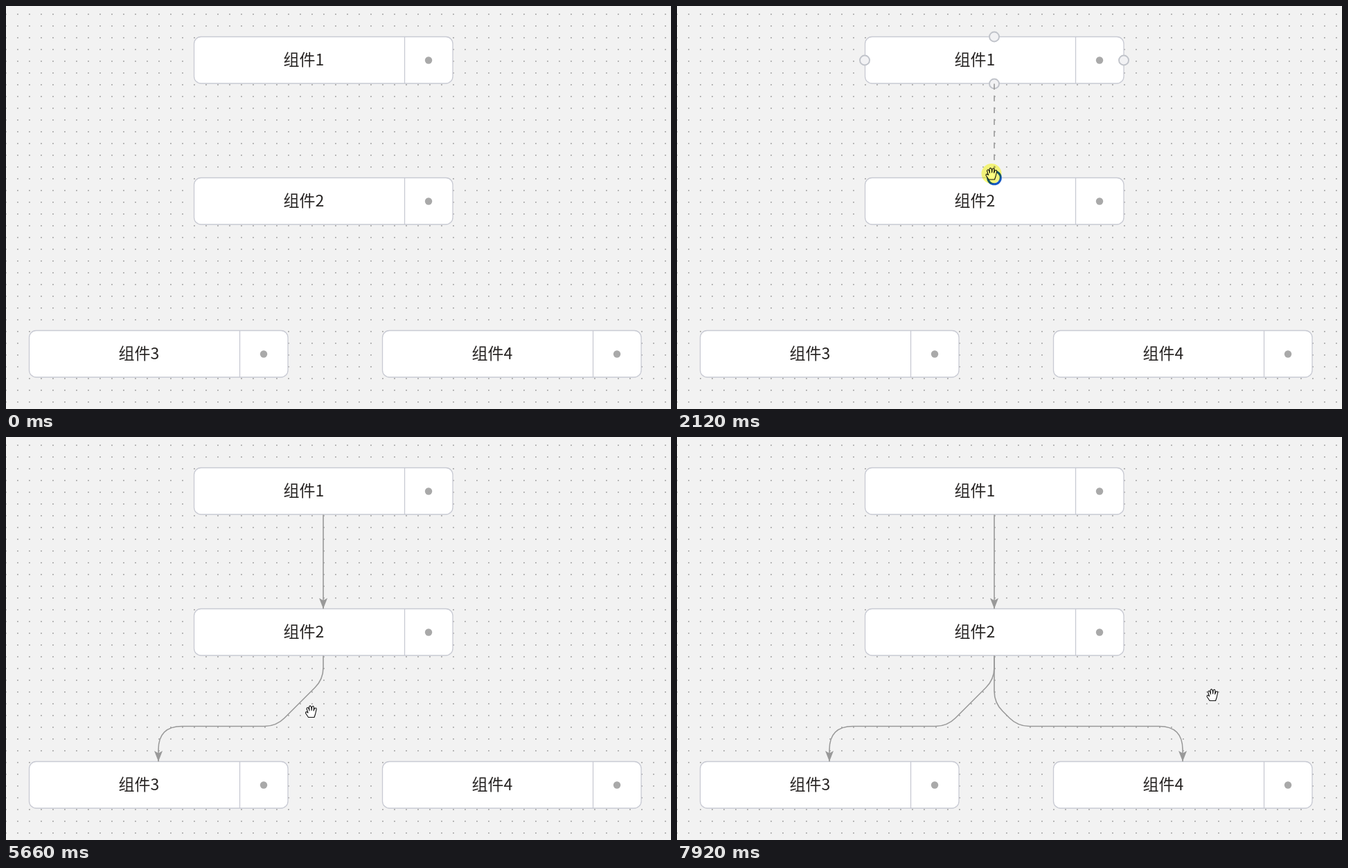
An HTML page with a canvas that plays this animation: 960x583 px, repeating every 8000 ms.

```html
<!DOCTYPE html>
<html lang="zh">
<head>
<meta charset="utf-8">
<style>
  html, body { margin: 0; width: 100%; height: 100%; overflow: hidden; background: #f2f2f2; }
  canvas { display: block; }
</style>
</head>
<body>
<canvas id="stage" width="960" height="583"></canvas>
<script>
const ctx = document.getElementById('stage').getContext('2d');
const LOOP = 8000, ENTER = 70, GRID = 17, W = 22 * GRID, H = 4 * GRID;
const LINE = '#999';

// Nodes sit on the grid; columns and rows are counted in grid steps
const nodes = [[14, 2], [14, 14], [0, 27], [30, 27]].map(([col, row], i) => ({
  x: 33 + col * GRID, y: 10.5 + row * GRID, label: '组件' + (i + 1)
}));
const [first, second, left, right] = nodes;

const point = (x, y) => ({ x, y });
const shift = (p, dx, dy) => point(p.x + dx, p.y + dy);
const near = (a, b, r) => Math.hypot(a.x - b.x, a.y - b.y) < r;
const topPort = n => point(n.x + W / 2, n.y);
const bottomPort = n => point(n.x + W / 2, n.y + H);
const portsOf = n => [topPort(n), bottomPort(n),
  point(n.x, n.y + H / 2), point(n.x + W, n.y + H / 2)];
const inside = (p, n, m) =>
  p.x > n.x - m && p.x < n.x + W + m && p.y > n.y - m && p.y < n.y + H + m;

const drags = [
  { start: 1570, end: 2200, from: first, to: second },
  { start: 3690, end: 4840, from: second, to: left },
  { start: 6280, end: 7310, from: second, to: right }
];

// The pointer rests between moves; swing bows a move sideways
const entry = shift(topPort(right), -90, 36);
const grip = shift(bottomPort(second), 2.5, -1.5);
const moves = [
  { start: ENTER, end: 400, to: shift(topPort(first), -5, 39) },
  { start: 600, end: 800, to: shift(topPort(first), -12, 28) },
  { start: 950, end: 1430, to: bottomPort(first), swing: 80 },
  { start: 1570, end: 2060, to: shift(topPort(second), -4, -6) },
  { start: 2200, end: 2330, to: shift(grip, -20, -6) },
  { start: 2660, end: 3420, to: grip },
  { start: 4160, end: 4640, to: shift(topPort(left), 14, 30) },
  { start: 4820, end: 4840, to: shift(topPort(left), 33, 20) },
  { start: 4840, end: 5460, to: shift(grip, -20, 82) },
  { start: 5660, end: 5800, to: grip },
  { start: 6280, end: 6420, to: shift(grip, 15, 2) },
  { start: 6420, end: 7060, to: shift(topPort(right), 19, -9) },
  { start: 7310, end: 7440, to: point(797, 410) },
  { start: 7440, end: 7920, to: point(773, 373) }
];

function pointerAt(t) {
  let p = entry;
  for (const { start, end, to, swing = 0 } of moves) {
    if (t < start) break;
    const k = Math.min(1, (t - start) / (end - start));
    const e = k * k * (3 - 2 * k);
    p = shift(p, (to.x - p.x) * e + swing * Math.sin(Math.PI * e), (to.y - p.y) * e);
  }
  return p;
}

function disc(p, r, fill, stroke, width) {
  ctx.beginPath();
  ctx.arc(p.x, p.y, r, 0, 2 * Math.PI);
  ctx.fillStyle = fill;
  ctx.fill();
  if (!stroke) return;
  ctx.strokeStyle = stroke;
  ctx.lineWidth = width;
  ctx.stroke();
}

function drawGrid() {
  ctx.fillStyle = '#f2f2f2';
  ctx.fillRect(0, 0, 960, 583);
  ctx.fillStyle = '#aaa';
  for (let x = -1; x < 960; x += GRID)
    for (let y = 11; y < 583; y += GRID) ctx.fillRect(x, y, 1.8, 1.8);
}

function drawNode({ x, y, label }) {
  ctx.beginPath();
  ctx.roundRect(x + .5, y, W - .5, H - .5, 10);
  ctx.fillStyle = '#fff';
  ctx.fill();
  ctx.moveTo(x + 304.5, y);
  ctx.lineTo(x + 304.5, y + H - .5);
  ctx.strokeStyle = '#c8cad3';
  ctx.lineWidth = 1.3;
  ctx.stroke();
  disc(point(x + 339, y + H / 2), 5.2, '#a9a9a9');
  ctx.fillStyle = '#262322';
  ctx.font = '23px "Noto Sans CJK SC", "Noto Sans CJK", sans-serif';
  ctx.textAlign = 'center';
  ctx.fillText(label, x + 159, y + 41.5);
}

// Octilinear path: down, diagonal, across, a one-step diagonal, down
function route(a, b) {
  const dx = b.x - a.x, side = Math.sign(dx), h = b.y - 3 * GRID;
  if (Math.abs(dx) < 2 * GRID || h < a.y + H) return [a, b];
  const d = Math.min(Math.abs(dx) - GRID, dx < 0 ? 4 * GRID : 2 * GRID);
  return [a, point(a.x, h - d), point(a.x + side * d, h),
    point(b.x - side * GRID, h), point(b.x, h + GRID), b];
}

function drawRoute(points, dash) {
  const toward = (p, q) => {
    const len = Math.hypot(q.x - p.x, q.y - p.y) || 1;
    const k = Math.min(GRID, len / 2) / len;
    return [p.x + (q.x - p.x) * k, p.y + (q.y - p.y) * k];
  };
  ctx.beginPath();
  ctx.moveTo(points[0].x, points[0].y);
  points.slice(1).forEach((p, i) => {
    const next = points[i + 2];
    if (!next) return ctx.lineTo(p.x, p.y);
    ctx.lineTo(...toward(p, points[i]));
    ctx.quadraticCurveTo(p.x, p.y, ...toward(p, next));
  });
  ctx.setLineDash(dash);
  ctx.strokeStyle = LINE;
  ctx.lineWidth = 1.6;
  ctx.stroke();
  ctx.setLineDash([]);
}

function drawHead({ x, y }, angle) {
  ctx.save();
  ctx.translate(x, y);
  ctx.rotate(angle);
  ctx.fillStyle = LINE;
  ctx.fill(new Path2D('M0 0L-6 -15.5L0 -12L6 -15.5Z'));
  ctx.restore();
}

const arrowShape = new Path2D('M.5 .5V15L4 11.8L6.3 17L8.8 16L6.5 10.8H11Z');
const handShape = new Path2D('M-4 8.5L-8 2.5Q-8 -1 -4.5 2L-6.5 -4Q-5 -8 -3 -3L-2.5 -1' +
  'L-3 -6.5Q-1.3 -10 .3 -6L.6 -1.5L1.2 -6.5Q3 -9.5 4 -5.5L3.6 -1L5 -4.5Q8 -6 7.5 -2.5L6 4L4.5 8.5Z');

function drawPointer(p, kind) {
  ctx.save();
  ctx.translate(p.x, p.y);
  if (kind === 'cross') {
    ctx.fillStyle = '#111';
    ctx.fillRect(-11.5, -1, 23, 2);
    ctx.fillRect(-1, -11.5, 2, 23);
  } else {
    const shape = kind === 'hand' ? handShape : arrowShape;
    ctx.fillStyle = '#fff';
    ctx.strokeStyle = '#111';
    ctx.lineWidth = 1.1;
    ctx.lineJoin = 'round';
    ctx.fill(shape);
    ctx.stroke(shape);
  }
  ctx.restore();
}

function drawDrag({ from, to }, p) {
  const start = bottomPort(from), end = topPort(to);
  const snapped = near(p, end, 2 * GRID);
  if (near(p, start, 1.5 * GRID)) drawHead(start, Math.PI / 2);
  else drawRoute(route(start, snapped ? end : p), [GRID / 2, GRID / 2]);
  if (snapped) disc(end, 9.3, '#f2f2f4', '#1557c4', 3);
}

function drawPressed(p) {
  ctx.globalCompositeOperation = 'multiply';
  disc(p, 14.5, '#ffff80');
  ctx.globalCompositeOperation = 'source-over';
}

function draw(t) {
  drawGrid();
  nodes.forEach(drawNode);
  for (const { end, from, to } of drags) {
    if (t < end) continue;
    drawRoute(route(bottomPort(from), topPort(to)), []);
    drawHead(topPort(to), 0);
  }
  if (t < ENTER) return;

  const p = pointerAt(t);
  const drag = drags.find(d => t >= d.start && t < d.end);
  const active = drag ? drag.from : nodes.find(n => inside(p, n, 8));
  const ports = active ? portsOf(active) : [];
  ports.forEach(port => disc(port, 7, '#f2f2f4', '#c0c3ca', 1.9));
  if (drag) drawDrag(drag, p);

  const onPort = ports.some(port => near(p, port, 9));
  const onNode = nodes.some(n => inside(p, n, 2));
  drawPointer(p, onPort ? 'cross' : onNode ? 'arrow' : 'hand');
  if (drag) drawPressed(p);
}

const begin = performance.now();
function tick() {
  draw((performance.now() - begin) % LOOP);
  requestAnimationFrame(tick);
}
tick();
</script>
</body>
</html>
```
